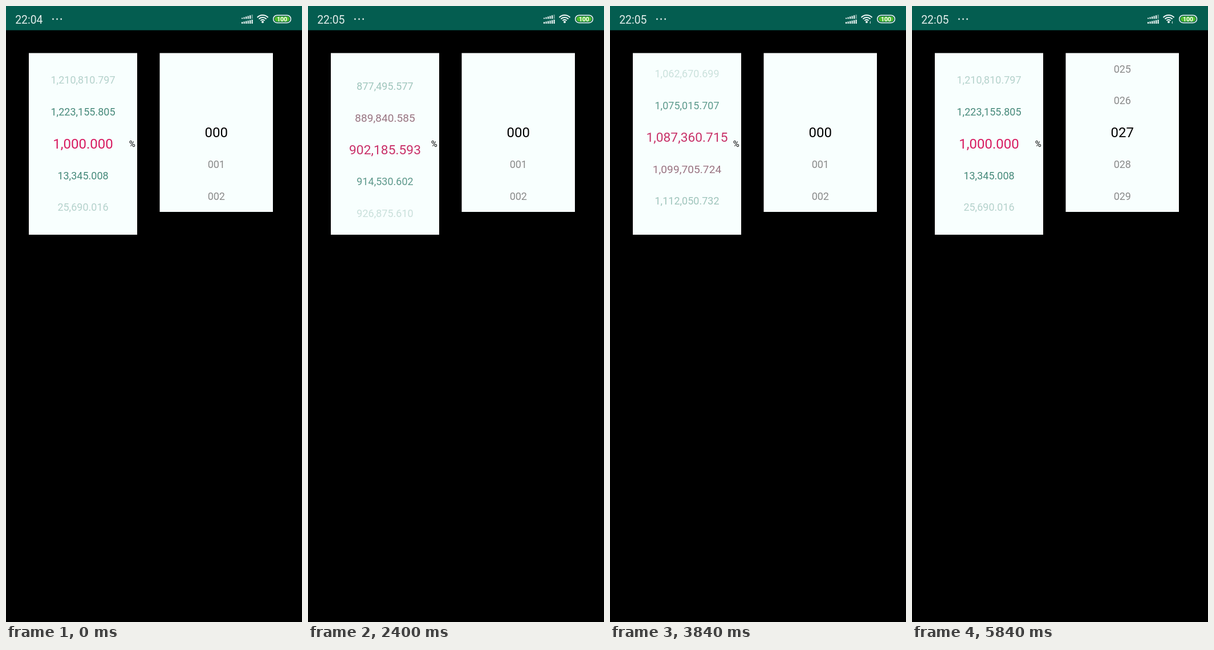
Recreate the animation shown at these times as an HTML page with a canvas. Size 519 by 1080 pixels, loop 6240 ms.

```html
<!DOCTYPE html>
<html lang="en">
<head>
<meta charset="utf-8">
<title>Number wheels</title>
<style>
  html, body { margin: 0; width: 100%; height: 100%; overflow: hidden; background: #000; }
  canvas { display: block; width: 519px; height: 1080px; }
</style>
</head>
<body>
<canvas id="stage"></canvas>
<script>
const LOOP = 6240, TICK = 80, PITCH = 55.75;
const canvas = document.getElementById('stage');
const ctx = canvas.getContext('2d');
const dpr = window.devicePixelRatio || 1;
canvas.width = 519 * dpr;
canvas.height = 1080 * dpr;

const PINK = [216, 27, 96], TEAL = [71, 138, 123], GRAY = [138, 138, 138], BLACK = [0, 0, 0];
const clamp = v => Math.min(1, Math.max(0, v));
const mix = (a, b, k) => a.map((v, i) => Math.round(v + (b[i] - v) * k));
const amount = new Intl.NumberFormat('en-US', { minimumFractionDigits: 3, maximumFractionDigits: 3 });

const left = {
  x: 40, y: 82.5, w: 190, h: 318.5, cx: 135, cy: 241.4,
  label: i => amount.format(1000 + 12345.00813 * ((i + 100) % 100)),
  color: d => d < 0.99 ? mix(PINK, GRAY, d) : TEAL,
  alpha: d => clamp(1 - (d - 1) * 0.62)
};
const right = {
  x: 269.5, y: 82.5, w: 198.5, h: 278.5, cx: 368.8, cy: 221.8,
  label: i => i < 0 ? '' : String(i).padStart(3, '0'),
  color: d => mix(BLACK, GRAY, Math.min(1, d)),
  alpha: () => 1
};

// Wheel positions, in rows
function leftPos(t) {
  if (t <= 1920) return 100;
  if (t < 2720) return 71 + 29 * Math.exp(-(t - 1920) / 173);
  if (t < 2960) return 71;
  if (t < 3840) return 71 + 17.2 * ((t - 2960) / 880) ** 1.463;
  return 100 - 11.8 * (1 - clamp((t - 3840) / 480)) ** 3;
}
const rightPos = t => 27 * (1 - (1 - clamp((t - 4640) / 1200)) ** 3);

// Text placed by the middle of its digits
function text(str, x, y, size, color, align = 'center', weight = 400) {
  ctx.font = `${weight} ${size}px Roboto, sans-serif`;
  ctx.textAlign = align;
  ctx.fillStyle = color;
  ctx.fillText(str, x, y + size * 0.356);
}

function pill(x, y, w, h) {
  ctx.beginPath();
  ctx.roundRect(x, y, w, h, h / 2);
}

function drawWheel(wheel, pos) {
  ctx.save();
  ctx.beginPath();
  ctx.rect(wheel.x, wheel.y, wheel.w, wheel.h);
  ctx.fillStyle = '#f8fffe';
  ctx.fill();
  ctx.clip();
  const mid = Math.round(pos);
  for (let i = mid - 3; i <= mid + 3; i++) {
    const d = Math.abs(i - pos);
    ctx.globalAlpha = wheel.alpha(d);
    text(wheel.label(i), wheel.cx, wheel.cy + (i - pos) * PITCH,
      24 - 6 * Math.min(1, d), `rgb(${wheel.color(d)})`);
  }
  ctx.restore();
}

function drawSignal() {
  for (let row = 0; row < 2; row++) {
    for (let i = 0; i < 6; i++) {
      const h = row ? 3 + i * 0.8 : 1.8 + i * 1.1;
      ctx.fillStyle = !row && i > 4 ? '#6f9f96' : '#eef6f4';
      ctx.fillRect(413 + i * 3.5, (row ? 31 : 22.5) - h, 2.2, h);
    }
  }
}

function drawWifi(down, up) {
  ctx.strokeStyle = ctx.fillStyle = '#f2f8f7';
  ctx.lineWidth = 2;
  for (const r of [5, 9, 13]) {
    ctx.beginPath();
    ctx.arc(450, 29, r, -Math.PI * 0.76, -Math.PI * 0.24);
    ctx.stroke();
  }
  ctx.beginPath();
  ctx.arc(450, 28, 2, 0, 7);
  ctx.fill();
  if (down) arrow(456.5, 30.5, -1);
  if (up) arrow(459, 26.5, 1);
}

function arrow(x, y, dir) {
  ctx.lineWidth = 0.8;
  ctx.beginPath();
  ctx.moveTo(x, y + dir * 4);
  ctx.lineTo(x, y);
  ctx.lineTo(x - 1, y + dir * 1.3);
  ctx.stroke();
}

function drawBattery() {
  pill(468.7, 16.2, 30.8, 13.2);
  ctx.strokeStyle = '#f2f8f7';
  ctx.lineWidth = 1.5;
  ctx.stroke();
  pill(470.8, 18.2, 26.6, 9.2);
  ctx.fillStyle = '#4cba2c';
  ctx.fill();
  text('100', 484, 22.9, 10.5, '#fff', 'center', 700);
}

function drawStatus(t) {
  ctx.fillStyle = '#045d50';
  ctx.fillRect(0, 0, 519, 42.5);
  text(t < 960 ? '22:04' : '22:05', 16.2, 24, 19.4, '#e4eeec', 'left');
  for (const x of [82.5, 89.6, 96.7]) {
    ctx.beginPath();
    ctx.arc(x, 23, 1.4, 0, 7);
    ctx.fill();
  }
  drawSignal();
  drawWifi((t >= 1360 && t < 2000) || t >= 3040, t >= 4240 && t < 4720);
  drawBattery();
}

function draw(t) {
  ctx.setTransform(dpr, 0, 0, dpr, 0, 0);
  ctx.fillStyle = '#000';
  ctx.fillRect(0, 0, 519, 1080);
  drawStatus(t);
  drawWheel(left, leftPos(t));
  text('%', 221.3, 241.6, 15, '#000');
  drawWheel(right, rightPos(t));
}

const start = performance.now();
function loop() {
  const t = (performance.now() - start) % LOOP;
  draw(Math.floor(t / TICK) * TICK);
  requestAnimationFrame(loop);
}
loop();
</script>
</body>
</html>
```
